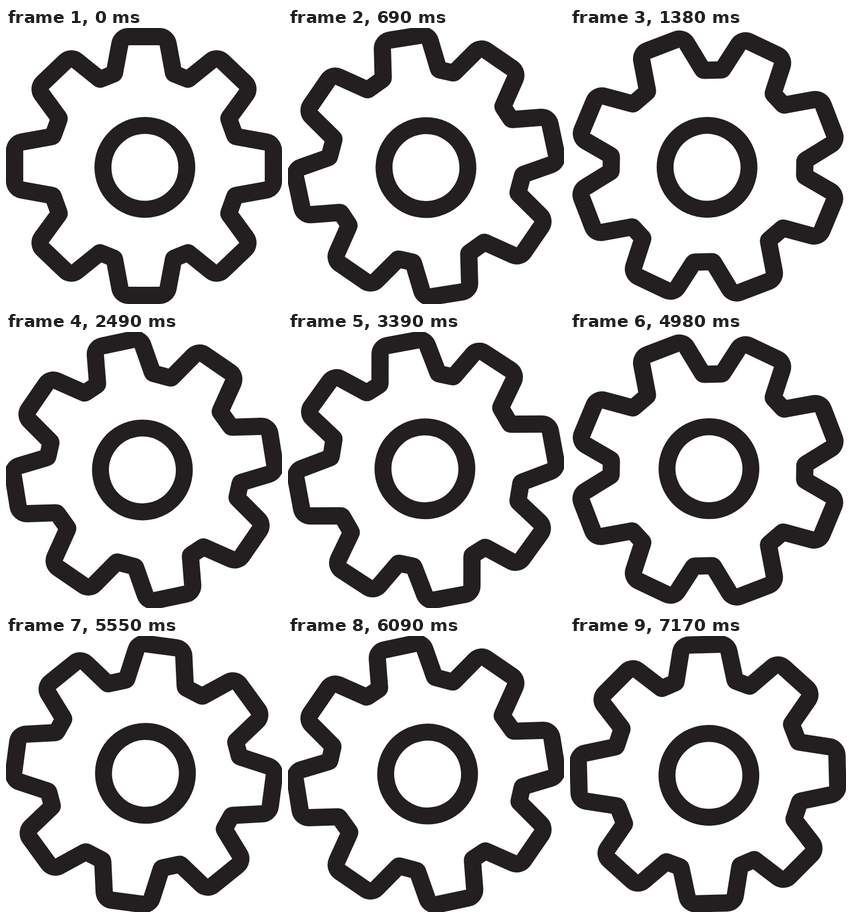
An HTML page with a canvas for the animation above (7.2 s loop, 512x512 px).

```html
<!DOCTYPE html>
<html lang="en">
<head>
<meta charset="utf-8">
<title>Turning gear</title>
<style>
  html, body { margin: 0; width: 100%; height: 100%; overflow: hidden; background: #fff; }
  canvas { display: block; width: 512px; height: 512px; }
</style>
</head>
<body>
<canvas id="stage" width="512" height="512"></canvas>
<script>
const ctx = document.getElementById('stage').getContext('2d');
const SIZE = 512, LOOP = 7200, STEP = 30;
const RIM = 32, TIP_BEND = 16, NOTCH_BEND = 4;

// Corners of the rim's centre line in the upper right quarter, clockwise.
const quarter = [
  [42.2, -240], [55, -171.4], [81.8, -160.6], [135.5, -204],
  [198, -144.5], [157, -88.4], [169, -55], [240, -42.2]
];

const mirror = (points, sx, sy) => points.map(([x, y]) => [x * sx, y * sy]);

function rimPath() {
  const back = [...quarter].reverse();
  const corners = [
    ...quarter, ...mirror(back, 1, -1),
    ...mirror(quarter, -1, -1), ...mirror(back, -1, 1)
  ];
  const path = new Path2D();
  path.moveTo(0, -240);
  corners.forEach(([x, y], i) => {
    const [nx, ny] = corners[(i + 1) % corners.length];
    path.arcTo(x, y, nx, ny, Math.hypot(x, y) > 200 ? TIP_BEND : NOTCH_BEND);
  });
  path.closePath();
  return path;
}

const rim = rimPath();
const hub = new Path2D();
hub.arc(1.6, 2.5, 77.75, 0, Math.PI * 2);

function draw(time) {
  const step = Math.floor((time % LOOP) / STEP);
  ctx.setTransform(1, 0, 0, 1, 0, 0);
  ctx.fillStyle = '#fff';
  ctx.fillRect(0, 0, SIZE, SIZE);
  ctx.translate(SIZE / 2, SIZE / 2);
  ctx.rotate(step * STEP / LOOP * Math.PI * 2);
  ctx.strokeStyle = '#231f20';
  ctx.lineWidth = RIM;
  ctx.stroke(rim);
  ctx.lineWidth = 31.5;
  ctx.stroke(hub);
}

const start = performance.now();
function tick() {
  draw(performance.now() - start);
  requestAnimationFrame(tick);
}
tick();
</script>
</body>
</html>
```
